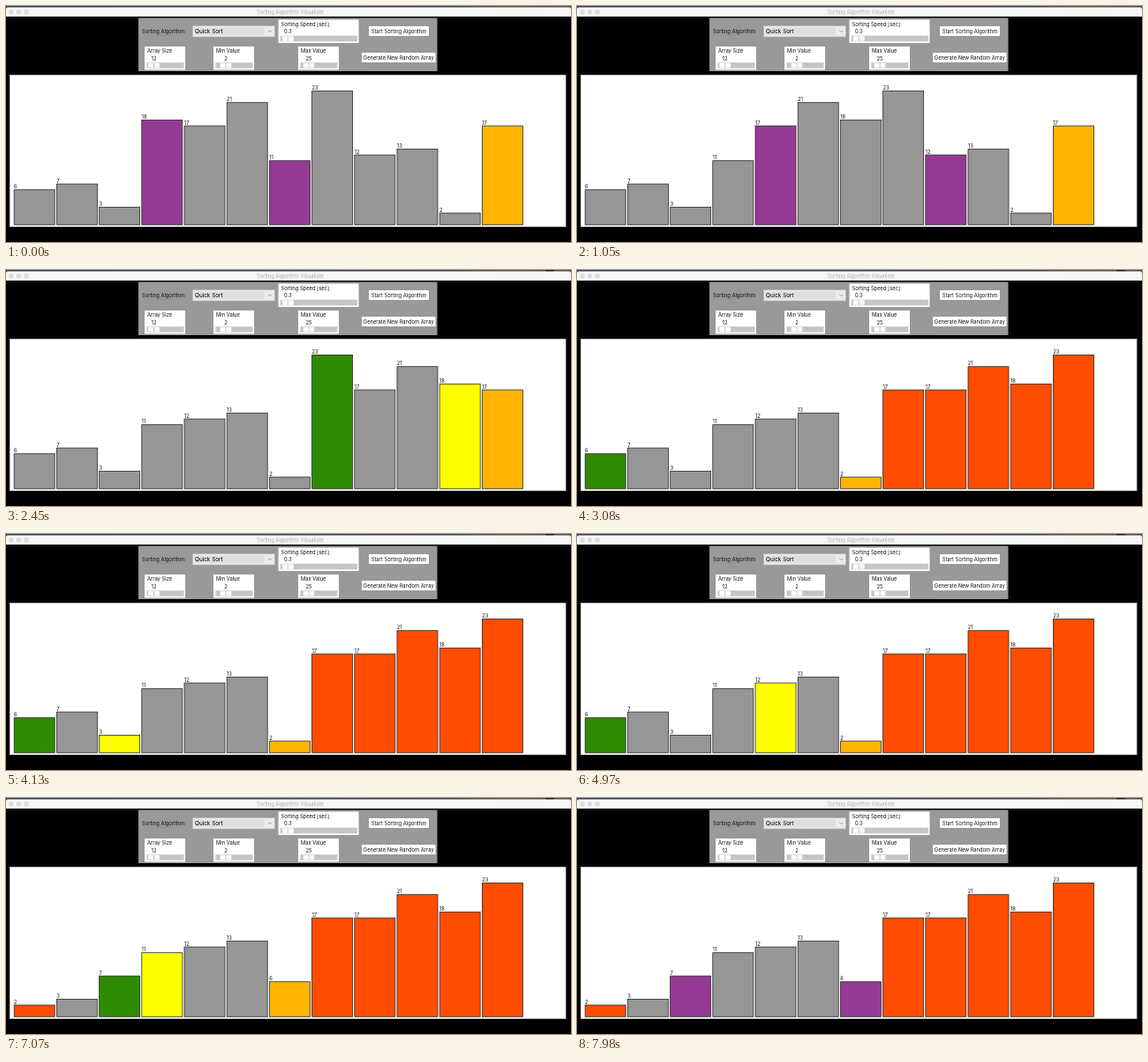
Animation, 640 px wide and 268 px high, one loop 8000 ms. Source, as an HTML page:

```html
<!DOCTYPE html>
<html lang="en">
<head>
<meta charset="utf-8">
<title>Sorting Algorithm Visualizer</title>
<style>
  html, body { margin: 0; width: 100%; height: 100%; overflow: hidden; background: #000; }
  svg { display: block; width: 640px; height: 268px; }
  text { font: 5.8px Inter, Roboto, sans-serif; fill: #111; white-space: pre; }
  .mid { text-anchor: middle; }
</style>
</head>
<body>
<svg id="stage" viewBox="0 0 640 268">
  <defs>
    <linearGradient id="desk">
      <stop offset="0" stop-color="#23406e"/>
      <stop offset=".5" stop-color="#2b4a78"/>
      <stop offset=".8" stop-color="#34465f"/>
      <stop offset=".9" stop-color="#6b5548"/>
      <stop offset="1" stop-color="#3a4a66"/>
    </linearGradient>
  </defs>
</svg>
<script>
const LOOP = 8000, STEP = 323, PHASE = 168, FIRST_STEP = 10;
const COLORS = {
  done: '#ff4c00', open: '#969696', pivot: '#ffb400',
  border: '#2e8b00', current: '#ffff00', swap: '#943a94'
};
const BASE = 248.3, UNIT = 6.6, PITCH = 48.2, LEFT = 9;

const stage = document.getElementById('stage');

function add(tag, attrs, content = '') {
  const node = document.createElementNS('http://www.w3.org/2000/svg', tag);
  for (const name in attrs) node.setAttribute(name, attrs[name]);
  node.textContent = content;
  return stage.appendChild(node);
}
const box = (x, y, width, height, fill, more) => add('rect', { x, y, width, height, fill, ...more });
const label = (x, y, content, more) => add('text', { x, y, ...more }, content);

function button(x, y, width, content) {
  box(x, y, width, 11, '#fff', { rx: 0.8 });
  label(x + width / 2, y + 7.7, content, { class: 'mid' });
}

function slider(x, y, width, height, name, value, knob) {
  box(x, y, width, height, '#fff');
  label(x + 3, y + 7.3, name);
  label(knob, y + 15.5, value, { class: 'mid' });
  const top = y + height - 8.3;
  box(x + 2.5, top, width - 4, 6.6, '#c6c6c6');
  box(knob - 6.3, top + 0.6, 12.6, 5.4, '#fff');
  box(knob - 0.4, top + 0.6, 0.8, 5.4, '#bbb');
}

function drawWindow() {
  box(0, 0, 640, 4, 'url(#desk)');
  const spot = add('ellipse', { cx: 616, cy: 0, rx: 5, ry: 2.6, fill: '#1a1a1e' });
  box(0, 1.6, 640, 10.4, '#f6f6f6', { rx: 2 });
  box(0, 6, 640, 6, '#f6f6f6');
  for (const cx of [6, 14.5, 23]) {
    add('circle', { cx, cy: 6.7, r: 2.5, fill: '#dcdcdc', stroke: '#cfcfcf', 'stroke-width': 0.4 });
  }
  label(322, 8.9, 'Sorting Algorithm Visualizer', { class: 'mid', style: 'fill:#aaa' });

  box(150, 13.5, 338.5, 60.5, '#999');
  label(154, 30.7, 'Sorting Algorithm:');
  box(211.5, 22.5, 93, 12.5, '#ebebeb', { stroke: '#b5b5b5', 'stroke-width': 0.7 });
  box(213, 24.5, 80, 8.5, '#dfdfdf');
  label(214, 31.1, 'Quick Sort', { style: 'font-size:6.4px;fill:#000' });
  add('path', { d: 'M297 27.6l2 2 2-2', fill: 'none', stroke: '#777', 'stroke-width': 0.7 });

  slider(308.5, 15.5, 91, 26.5, 'Sorting Speed [sec]', '0.3', 319.3);
  slider(157, 46, 46, 26.5, 'Array Size', '12', 167.5);
  slider(235, 46, 46, 26.5, 'Min Value', '2', 249);
  slider(331, 46, 46, 26.5, 'Max Value', '25', 343);
  button(411, 23, 68, 'Start Sorting Algorithm');
  button(403, 53, 83.5, 'Generate New Random Array');

  box(4.5, 78.5, 629.5, 172, '#fff', { stroke: '#ccc', 'stroke-width': 0.8 });
  return spot;
}

// Quicksort with the last item as pivot; every redraw is kept as one step.
function traceSort(data) {
  const steps = [];
  const exchange = (a, b) => { [data[a], data[b]] = [data[b], data[a]]; };

  function record(head, tail, border, current, swapping) {
    const colors = data.map((_, i) => {
      if (swapping && (i === border || i === current)) return COLORS.swap;
      if (i === tail) return COLORS.pivot;
      if (i === border) return COLORS.border;
      if (i === current) return COLORS.current;
      return i >= head && i <= tail ? COLORS.open : COLORS.done;
    });
    steps.push({ values: [...data], colors });
  }

  function sort(head, tail) {
    if (head >= tail) return;
    let border = head;
    record(head, tail, border, border);
    for (let j = head; j < tail; j++) {
      if (data[j] < data[tail]) {
        record(head, tail, border, j, true);
        exchange(border++, j);
      }
      record(head, tail, border, j);
    }
    record(head, tail, border, tail, true);
    exchange(border, tail);
    sort(head, border - 1);
    sort(border + 1, tail);
  }

  sort(0, data.length - 1);
  return steps;
}

const steps = traceSort([6, 7, 3, 18, 17, 21, 11, 23, 12, 13, 2, 17]);
const spot = drawWindow();
const bars = steps[0].values.map((_, i) => {
  const x = LEFT + i * PITCH;
  return {
    rect: box(x + 0.2, 0, 46, 0, COLORS.open, { stroke: '#2b2b2b', 'stroke-width': 0.8 }),
    text: label(x, 0, '')
  };
});

let shown = -1;
function render(now) {
  const time = now % LOOP;
  const index = FIRST_STEP + Math.floor((time + PHASE) / STEP);
  spot.setAttribute('visibility', time < 1750 ? 'hidden' : 'visible');
  if (index !== shown) {
    shown = index;
    const { values, colors } = steps[index];
    bars.forEach(({ rect, text }, i) => {
      const height = values[i] * UNIT;
      rect.setAttribute('y', BASE - height);
      rect.setAttribute('height', height);
      rect.setAttribute('fill', colors[i]);
      text.setAttribute('y', BASE - height - 1.3);
      text.textContent = values[i];
    });
  }
}

const start = performance.now();
function tick() {
  render(performance.now() - start);
  requestAnimationFrame(tick);
}
tick();
</script>
</body>
</html>
```
